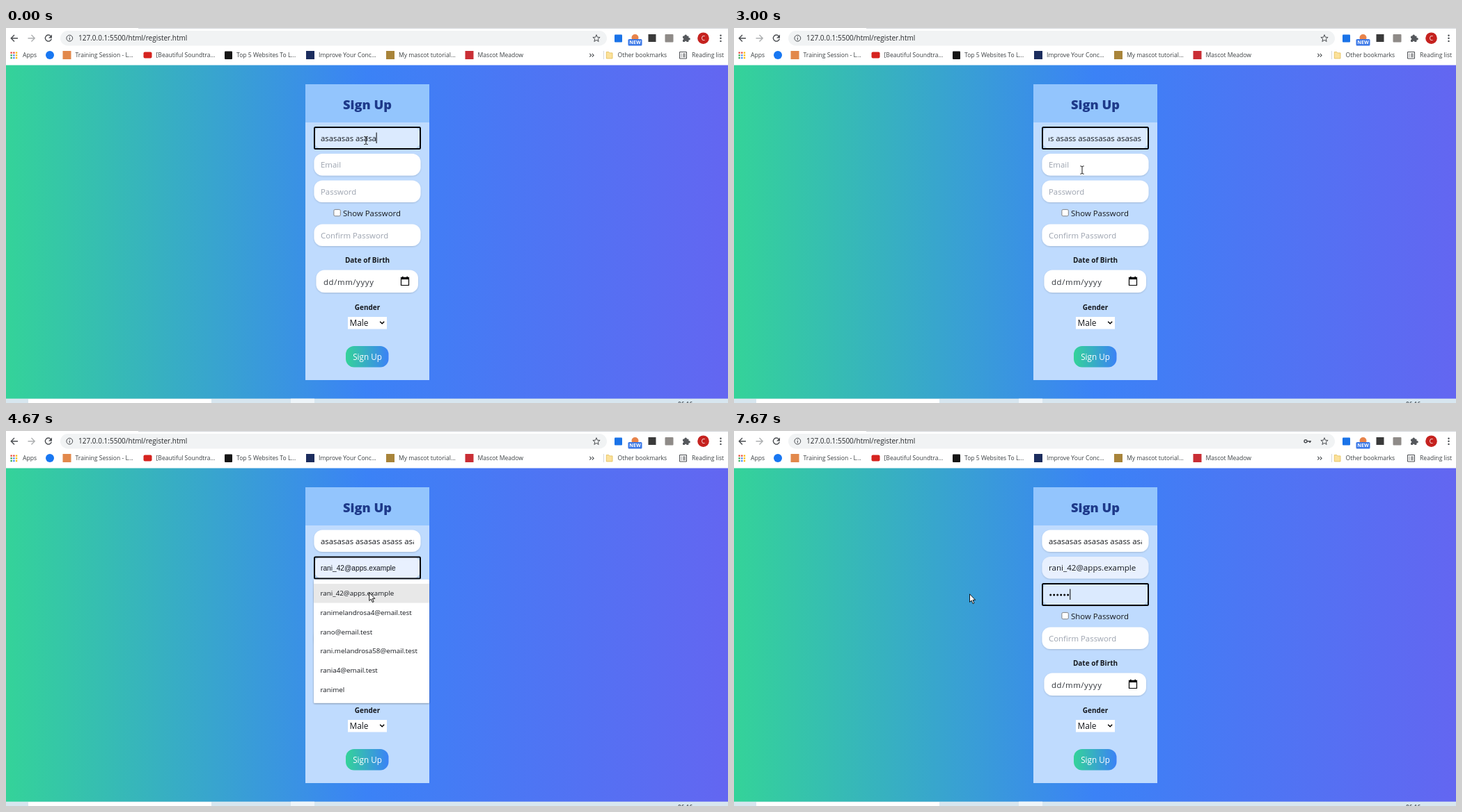
An HTML page for the animation above (8 s loop, 1037 by 540 pixels).

```html
<!DOCTYPE html>
<html lang="en">
<head>
<meta charset="utf-8">
<title>Sign Up</title>
<style>
html, body { margin: 0; width: 100%; height: 100%; overflow: hidden; background: #fff; }
svg { display: block; width: 100vw; height: 100vh; }
text { font-family: "Open Sans", "Noto Sans", sans-serif; font-size: 11.4px; fill: #15181d; white-space: pre; }
.url { font-size: 10px; fill: #26282b; }
.mark text { font-size: 8.6px; fill: #3c4043; }
.title { font-size: 18.3px; font-weight: 800; fill: #1e3a8a; }
.label { font-size: 10px; font-weight: 700; }
.hint { fill: #9ca3af; }
.item { font-size: 9.8px; }
.mid { text-anchor: middle; }
.line { fill: none; stroke: #4a4d51; stroke-width: 1.4; }
</style>
</head>
<body>
<svg viewBox="0 0 1037 540" preserveAspectRatio="none">
  <defs>
    <linearGradient id="page">
      <stop offset="0" stop-color="#34d399"/>
      <stop offset=".5" stop-color="#3b82f6"/>
      <stop offset="1" stop-color="#6366f1"/>
    </linearGradient>
    <linearGradient id="btn">
      <stop offset="0" stop-color="#34d399"/>
      <stop offset="1" stop-color="#3b82f6"/>
    </linearGradient>
    <filter id="soft" x="-10%" y="-20%" width="120%" height="150%">
      <feDropShadow dx="0" dy="1" stdDeviation=".8" flood-color="#000" flood-opacity=".16"/>
    </filter>
    <filter id="drop" x="-5%" y="-5%" width="110%" height="110%">
      <feDropShadow dx="0" dy="1" stdDeviation="1.3" flood-color="#000" flood-opacity=".35"/>
    </filter>
    <clipPath id="inner"><rect x="452" y="143" width="134" height="32"/></clipPath>
  </defs>

  <!-- browser toolbar -->
  <rect width="1037" height="54" fill="#fff"/>
  <rect x="190" width="847" height="1" fill="#d5d8dc"/>
  <rect x="78" y="4" width="785" height="21.5" rx="10.7" fill="#f1f3f4"/>
  <path class="line" d="M17 14.7H7.5M12 10l-4.7 4.7 4.7 4.7"/>
  <path class="line" stroke-opacity=".45" d="M31.5 14.7H41M36.5 10l4.7 4.7-4.7 4.7"/>
  <path class="line" d="M64.3 11.6A4.5 4.5 0 1 0 65.3 15.6"/>
  <path d="M66 9.4v5h-5z" fill="#4a4d51"/>
  <circle class="line" cx="91.3" cy="14.7" r="4.4" style="stroke-width:1"/>
  <path class="line" d="M91.3 14v3.2M91.3 11.9v1.2" style="stroke-width:1.1"/>
  <text class="url" x="104" y="18.3">127.0.0.1:5500/html/register.html</text>
  <path id="star" class="line" style="stroke-width:1"/>
  <g id="key" fill="#4a4d51">
    <circle class="line" cx="821" cy="14.7" r="2"/>
    <path d="M823 13.9h6v1.6h-1v1.5h-1.7v-1.5H823z"/>
  </g>
  <rect x="874" y="9.5" width="11" height="11" rx="1" fill="#1a73e8"/>
  <circle cx="903.5" cy="14" r="5" fill="#e8834a"/>
  <rect x="893.5" y="16" width="20" height="9.5" rx="1.5" fill="#3b78e7"/>
  <text class="mid" x="903.5" y="23.4" style="font-size:7px;font-weight:700;fill:#fff">NEW</text>
  <rect x="922.5" y="9" width="11" height="11" fill="#3a3a3a"/>
  <rect x="946.5" y="9" width="12" height="11.5" rx="1" fill="#8f8b88"/>
  <g fill="#55585c">
    <rect x="972" y="11.5" width="8.5" height="8.5" rx="1"/>
    <circle cx="976.2" cy="11.2" r="1.8"/><circle cx="981" cy="15.7" r="1.8"/>
  </g>
  <circle cx="972" cy="15.8" r="1.3" fill="#fff"/><circle cx="976.2" cy="20" r="1.3" fill="#fff"/>
  <circle cx="1001.5" cy="14.7" r="8.3" fill="#c5221f"/>
  <text class="mid" x="1001.5" y="17.9" style="font-size:8.6px;fill:#fff">C</text>
  <g fill="#4a4d51"><circle cx="1026.5" cy="10.7" r="1.2"/><circle cx="1026.5" cy="14.8" r="1.2"/><circle cx="1026.5" cy="18.9" r="1.2"/></g>

  <!-- bookmarks bar -->
  <g id="apps"></g>
  <g class="mark">
    <circle cx="63" cy="39" r="6" fill="#1877f2"/>
    <rect x="81.500" y="33" width="12" height="12" fill="#e2884b"/>
    <rect x="197.500" y="34.500" width="12" height="9" rx="2" fill="#d6231f"/>
    <rect x="314" y="33.500" width="11" height="11.500" rx="1" fill="#161616"/>
    <rect x="431" y="33" width="12" height="12" fill="#1c2d5e"/>
    <rect x="546" y="33" width="12" height="12" fill="#a8843a"/>
    <rect x="659.500" y="33" width="12" height="12" fill="#c92e35"/>
    <text x="24" y="42.300">Apps</text>
    <text x="99.500" y="42.300">Training Session - L...</text>
    <text x="215.500" y="42.300">[Beautiful Soundtra...</text>
    <text x="331" y="42.300">Top 5 Websites To L...</text>
    <text x="449" y="42.300">Improve Your Conc...</text>
    <text x="564" y="42.300">My mascot tutorial...</text>
    <text x="677.500" y="42.300">Mascot Meadow</text>
    <text x="878.500" y="42.300">Other bookmarks</text>
    <text x="985" y="42.300">Reading list</text>
  </g>
  <path class="line" style="stroke-width:1.1" d="M838.300 36.800l2.300 2.400-2.300 2.400M841.800 36.800l2.300 2.400-2.300 2.400"/>
  <path d="M858.500 33v12" stroke="#d5d8dc"/>
  <path d="M862.300 34.500h3.500l1.200 1.400h4v8h-8.700z" fill="#fbe19a" stroke="#e3bd55" stroke-width=".8"/>
  <path class="line" style="stroke-width:1" d="M967.500 34.500h10v9.500h-10zM969.300 37.300h1.200M972 37.300h4M969.300 39.300h1.200M972 39.300h4M969.300 41.300h1.200M972 41.300h4"/>

  <!-- page -->
  <rect y="53.500" width="1037" height="480.500" fill="url(#page)"/>
  <rect y="533.700" width="1037" height="6.300" fill="#d7e6ef"/>
  <rect x="32" y="534.300" width="263" height="5.700" fill="#fff"/>
  <rect x="409" y="533.700" width="34" height="6.300" fill="#eef5f9"/>
  <text x="965" y="544.500" style="font-size:8.300px">06:16</text>

  <rect x="430" y="81" width="178" height="426" fill="#bfdbfe"/>
  <rect x="430" y="81" width="178" height="55" fill="#93c5fd"/>
  <text class="title mid" x="519" y="116.500">Sign Up</text>
  <g id="fields"></g>
  <g clip-path="url(#inner)"><text id="name" y="163"></text></g>
  <text id="mail" x="452" y="201.300"></text>
  <text id="pass" class="hint" x="452" y="239.800">Password</text>
  <g id="dots"></g>
  <rect x="470.900" y="261.400" width="9.400" height="9.400" rx="1.800" fill="#fff" stroke="#767676" stroke-width=".9"/>
  <text x="484" y="271">Show Password</text>
  <text class="hint" x="452" y="302.700">Confirm Password</text>
  <text class="label mid" x="519" y="338.200">Date of Birth</text>
  <rect x="445.500" y="348.500" width="146.500" height="32.500" rx="12" fill="#fff" filter="url(#soft)"/>
  <text x="456" y="369.800" style="letter-spacing:.6px;fill:#32363c">dd/mm/yyyy</text>
  <path d="M567.500 359.300h11v11.200h-11z" fill="none" stroke="#000" stroke-width="1.200"/>
  <path d="M567 359h12v3h-12zM569 357.800h1.500v2H569zM575.500 357.800h1.500v2h-1.500z"/>
  <text class="label mid" x="519" y="405.500">Gender</text>
  <rect x="491" y="416" width="56" height="17.500" fill="#fff"/>
  <text x="493.500" y="429.400" style="font-size:11.900px">Male</text>
  <path d="M537.200 422.800l3 3 3-3" fill="none" stroke="#000" stroke-width="1.500"/>
  <rect x="488" y="458" width="61.500" height="30.500" rx="12" fill="url(#btn)"/>
  <text class="mid" x="519" y="477.900" style="font-size:11.700px;fill:#fff">Sign Up</text>

  <rect id="ring" x="443" width="152" height="31" rx="1.500" fill="none" stroke="#05070a" stroke-width="2"/>
  <rect id="caret" width="1" height="15.500" fill="#000"/>
  <g id="list">
    <rect id="panel" x="442" y="213.800" height="178" rx="1.500" fill="#fff" filter="url(#drop)"/>
    <rect id="hover" x="442" y="220" width="166" height="27.500" fill="#e8e8e8"/>
    <g id="items"></g>
  </g>
  <path id="beam" d="M-2.700-5.700Q0-5.700 0-4.500V4.500Q0 5.700-2.700 5.700M2.700-5.700Q0-5.700 0-4.500M0 4.500Q0 5.700 2.700 5.700" fill="none" stroke="#1b1b1b"/>
  <path id="arrow" d="M0 0V11.600L2.600 9.200 4.600 13.800 6.400 13 4.500 8.500H8.100Z" fill="#fff" stroke="#000" stroke-width=".9"/>
</svg>
<script>
const LOOP = 8000;
const NS = 'http://www.w3.org/2000/svg';
const $ = id => document.getElementById(id);

function add(parent, tag, attrs, text) {
  const el = document.createElementNS(NS, tag);
  for (const k in attrs) el.setAttribute(k, attrs[k]);
  if (text) el.textContent = text;
  return $(parent).appendChild(el);
}
const set = (id, attrs) => { for (const k in attrs) $(id).setAttribute(k, attrs[k]); };
const show = (id, on) => $(id).style.display = on ? '' : 'none';

// Static repeats
const tops = [142.5, 181, 219.5, 282.5];
const boxes = tops.map(y => add('fields', 'rect', {
  x: 442.5, y, width: 153, height: 31.5, rx: 12, filter: 'url(#soft)'
}));
['#ea4335', '#ea4335', '#fbbc04', '#34a853', '#4285f4', '#fbbc04', '#34a853', '#4285f4', '#fbbc04'].forEach((fill, i) =>
  add('apps', 'rect', { x: 6.5 + i % 3 * 3.7, y: 34.5 + Math.floor(i / 3) * 3.7, width: 2.3, height: 2.3, fill }));
const dots = Array.from({ length: 6 }, (_, i) =>
  add('dots', 'circle', { cx: 454.7 + i * 5, cy: 235.9, r: 1.5 }));
const items = Array.from({ length: 6 }, (_, i) =>
  add('items', 'text', { class: 'item', x: 451.5, y: 237.3 + i * 27.65 }));
set('star', { d: 'M' + Array.from({ length: 10 }, (_, i) => {
  const a = Math.PI * i / 5, r = i % 2 ? 2.3 : 5.4;
  return (848 + r * Math.sin(a)).toFixed(2) + ' ' + (15.1 - r * Math.cos(a)).toFixed(2);
}).join('L') + 'Z' });

const pick = 'rani_42@apps.example';
const all = ['amberlantern27@email.test', pick, 'ranimelandrosa4@email.test',
  'amberlantern58@email.test', 'sentia@email.test', 'senti@email.test'];
const matches = [pick, 'ranimelandrosa4@email.test', 'rano@email.test',
  'rani.melandrosa58@email.test', 'rania4@email.test', 'ranimel'];
const typed = 'asasasas asasas asass asassasas asasas';

// Each step overrides part of the state: n = typed letters, focus = active field
const steps = [
  { t: 0, n: 14, focus: 0, caret: true, beam: [517, 162], mail: '', dots: 0 },
  { t: 330, n: 18 },
  { t: 650, n: 22 },
  { t: 980, n: 27 },
  { t: 1320, n: 31 },
  { t: 1660, n: 34 },
  { t: 1990, n: 38 },
  { t: 2320, beam: [513, 172] },
  { t: 2670, beam: [502.5, 200.5], caret: false },
  { t: 3000, beam: [500, 204.5] },
  { t: 3400, focus: 1, caret: true, list: all },
  { t: 3670, mail: 'ra', list: matches },
  { t: 4020, mail: pick, preview: true, filled: true, caret: false, beam: null, arrow: [503.5, 222.5] },
  { t: 4670, arrow: [521.8, 232.8] },
  { t: 5020, preview: false, list: null, arrow: null, beam: [524, 236] },
  { t: 5370, beam: [545, 236] },
  { t: 5680, focus: 2, caret: true, beam: [540.7, 235.5] },
  { t: 6370, caret: false, beam: null, arrow: [339.3, 231.5] },
  { t: 7000, caret: true, dots: 4 },
  { t: 7330, dots: 5, arrow: [338.5, 230.5] },
  { t: 7670, dots: 6, arrow: [338.5, 234.8] }
];

function pointer(id, pos) {
  show(id, pos);
  if (pos) set(id, { transform: `translate(${pos})` });
}

function draw(t) {
  const s = Object.assign({}, ...steps.filter(p => p.t <= t));

  boxes.forEach((b, i) => b.setAttribute('fill',
    i === 1 && s.filled ? '#e8f0fe' : i === s.focus ? '#dbeafe' : '#fff'));
  set('ring', { y: tops[s.focus] + .4 });

  // The active name field scrolls so that its end stays in view
  $('name').textContent = typed.slice(0, s.n);
  const w = $('name').getComputedTextLength();
  const x = s.focus ? 452 : Math.min(452, 585 - w);
  set('name', { x });

  const mail = $('mail');
  mail.textContent = s.mail || 'Email';
  mail.setAttribute('class', s.mail ? '' : 'hint');
  mail.style.fontSize = s.preview ? '10.2px' : s.mail ? '11.6px' : '';
  mail.style.fontFamily = s.preview ? '"Liberation Sans", sans-serif' : '';

  show('pass', !s.dots);
  dots.forEach((d, i) => d.style.display = i < s.dots ? '' : 'none');
  show('key', s.dots);

  const ends = [x + w - .3, 452.3 + (s.mail ? mail.getComputedTextLength() : 0), 452.3 + s.dots * 5];
  show('caret', s.caret);
  set('caret', { x: ends[s.focus], y: tops[s.focus] + 8 });

  show('list', s.list);
  if (s.list) {
    set('panel', { width: s.list === all ? 157 : 166 });
    items.forEach((el, i) => el.textContent = s.list[i]);
    show('hover', s.preview);
  }
  pointer('beam', s.beam);
  pointer('arrow', s.arrow);
}

const start = performance.now();
function tick() {
  draw((performance.now() - start) % LOOP);
  requestAnimationFrame(tick);
}
tick();
</script>
</body>
</html>
```
